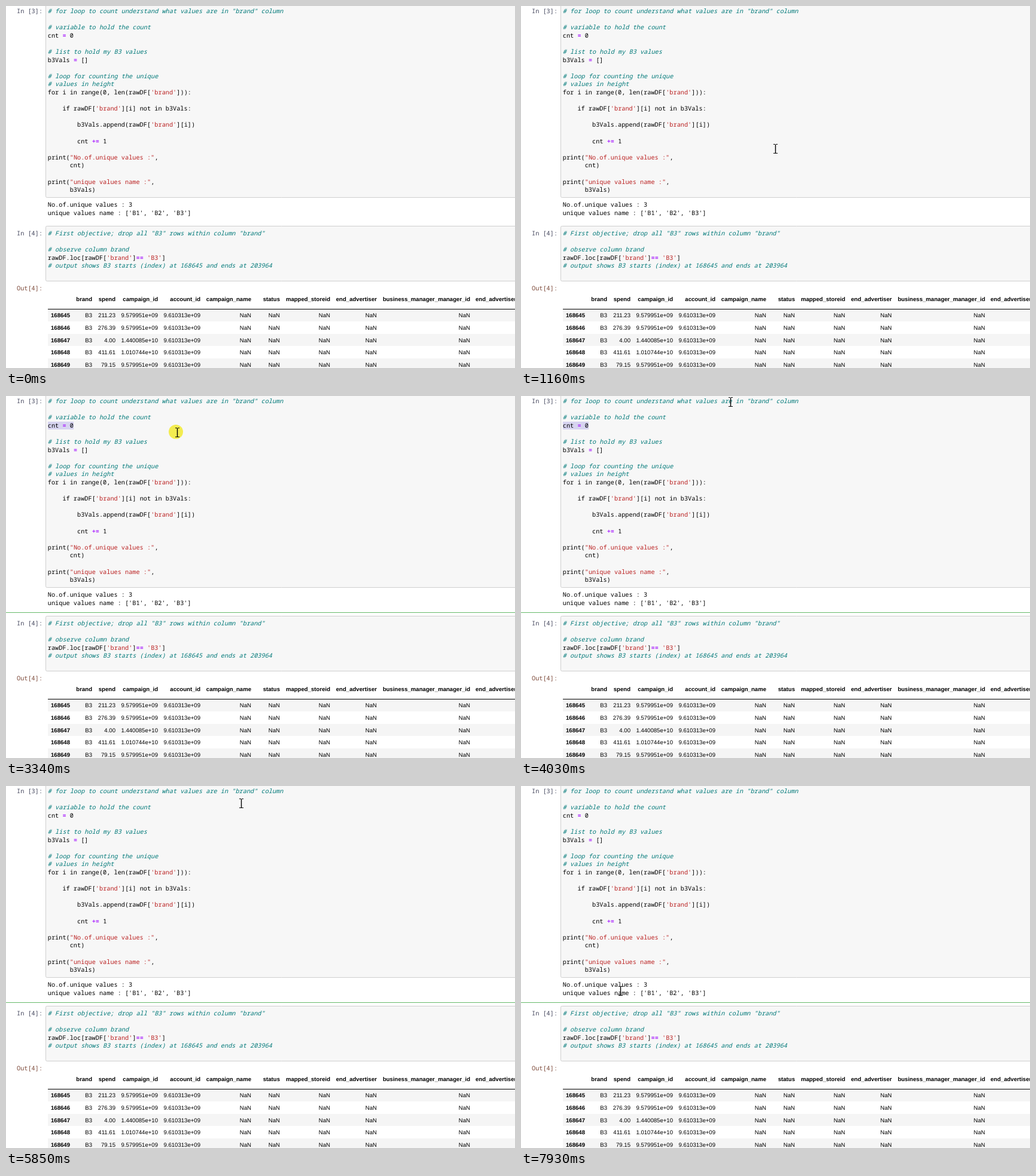
An HTML page with a canvas for the animation above (8 s loop, 851 by 606 pixels).

```html
<!DOCTYPE html>
<html lang="en">
<head>
<meta charset="utf-8">
<title>Notebook walkthrough</title>
<style>
  html, body { margin: 0; width: 100%; height: 100%; overflow: hidden; background: #fff; }
  canvas { display: block; }
</style>
</head>
<body>
<canvas id="stage" width="851" height="606"></canvas>
<script>
const W = 851, H = 606, LOOP = 8000, STEP = 70;
const ctx = document.getElementById('stage').getContext('2d');

const MONO = '10.264px "Noto Sans Mono", "DejaVu Sans Mono", monospace';
const SANS = '9.6px "Liberation Sans", Arial, sans-serif';
const CHAR = 6.158, LINE = 13.6, LEFT = 69.8;

const loopCell = `# for loop to count understand what values are in "brand" column

# variable to hold the count
cnt = 0

# list to hold my B3 values
b3Vals = []

# loop for counting the unique
# values in height
for i in range(0, len(rawDF['brand'])):

    if rawDF['brand'][i] not in b3Vals:

        b3Vals.append(rawDF['brand'][i])

        cnt += 1

print("No.of.unique values :",
      cnt)

print("unique values name :",
      b3Vals)`;

const filterCell = `# First objective; drop all "B3" rows within column "brand"

# observe column brand
rawDF.loc[rawDF['brand']== 'B3']
# output shows B3 starts (index) at 168645 and ends at 203964`;

const output = `No.of.unique values : 3
unique values name : ['B1', 'B2', 'B3']`;

// Column name and right edge
const columns = [
  ['brand', 144], ['spend', 183], ['campaign_id', 254], ['account_id', 325],
  ['campaign_name', 410], ['status', 458], ['mapped_storeid', 542],
  ['end_advertiser', 620], ['business_manager_manager_id', 776]
];
const spend = ['211.23', '276.39', '4.00', '411.61', '79.15'];
const campaign = ['9.579951e+09', '9.579951e+09', '1.440085e+10', '1.010744e+10', '9.579951e+09'];

// Pointer path: time, x, y
const path = [
  [660, 843, 581], [870, 660, 428], [1160, 425, 239], [1440, 301, 184],
  [1510, 270, 164], [1790, 140, 85], [2060, 77, 48], [2190, 77, 48],
  [2260, 74, 46], [2530, 73, 46], [2650, 73, 46], [2860, 112, 49],
  [3130, 210, 56], [3340, 286, 61], [3620, 326, 40], [4100, 359, -1],
  [4760, 359, -1], [4830, 370, 4], [5040, 385, 9], [5780, 385, 9],
  [6130, 424, 110], [6390, 438, 225], [6600, 437, 292], [6670, 436, 296],
  [6740, 436, 297], [6950, 370, 318], [7230, 225, 348], [7440, 185, 345],
  [7590, 182, 345], [7720, 182, 345], [7790, 176, 345], [7930, 166, 343]
];

const between = (t, a, b) => t >= a && t < b;

function box(x, y, w, h, color) {
  ctx.fillStyle = color;
  ctx.fillRect(x, y, w, h);
}

function text(str, x, y, font, color = '#000', align = 'left') {
  ctx.font = font;
  ctx.fillStyle = color;
  ctx.textAlign = align;
  ctx.fillText(str, x, y);
}

function frame(y, h) {
  ctx.beginPath();
  ctx.roundRect(66.5, y + 0.5, W, h, 2);
  ctx.fillStyle = '#f7f7f7';
  ctx.fill();
  ctx.strokeStyle = '#cfcfcf';
  ctx.lineWidth = 1;
  ctx.stroke();
}

function codeLine(line, y) {
  if (line[0] === '#') return text(line, LEFT, y, 'italic ' + MONO, '#007979');
  let col = 0;
  for (const part of line.split(/('[^']*'|"[^"]*"|[+=]+)/)) {
    const isString = /^['"]/.test(part), isOperator = /^[+=]/.test(part);
    const color = isString ? '#ba2121' : isOperator ? '#aa22ff' : '#000';
    text(part, LEFT + col * CHAR, y, (isOperator ? 'bold ' : '') + MONO, color);
    col += part.length;
  }
}

function eachLine(str, y, draw) {
  str.split('\n').forEach((line, i) => draw(line, Math.round(y + i * LINE)));
}

function table() {
  const bold = 'bold ' + SANS;
  for (const [name, x] of columns) text(name, x, 494, bold, '#000', 'right');
  text('end_advertiser_id', 785, 494, bold);
  box(70, 507, W, 1, '#000');
  spend.forEach((amount, r) => {
    const top = Math.round(508 + r * 20.6), y = Math.round(521 + r * 20.75);
    if (r % 2 === 0) box(70, top, W, 20, '#f5f5f5');
    text(168645 + r, 107, y, bold, '#000', 'right');
    const cells = ['B3', amount, campaign[r], '9.610313e+09'];
    columns.forEach(([, x], c) => text(cells[c] || 'NaN', x, y, SANS, '#000', 'right'));
  });
}

function pointer(t) {
  let i = path.length - 1;
  while (i > 0 && path[i][0] > t) i--;
  const [t0, x0, y0] = path[i];
  if (i === path.length - 1) return [x0, y0];
  const [t1, x1, y1] = path[i + 1];
  const k = Math.floor((t - t0) / STEP) * STEP / (t1 - t0);
  return [Math.round(x0 + (x1 - x0) * k), Math.round(y0 + (y1 - y0) * k)];
}

function beam(x, y) {
  box(x - 0.2, y - 7, 1.4, 15, '#000');
  for (const edge of [y - 8, y + 7]) {
    box(x - 3, edge, 3, 1, '#000');
    box(x + 1, edge, 3, 1, '#000');
  }
}

function draw(t) {
  const [x, y] = pointer(t);
  box(0, 0, W, H, '#fff');
  frame(-10, 330);
  frame(368, 92);

  if (between(t, 2650, 4370)) {
    const chars = Math.max(0, Math.min(7, Math.round((x - LEFT) / CHAR)));
    box(70, 43, chars * CHAR, 13, '#d7d4f0');
  }

  text('In [3]:', 18, 12, MONO, '#45485e');
  text('In [4]:', 18, 384, MONO, '#45485e');
  text('Out[4]:', 18, 476, MONO, '#7d4a3a');
  eachLine(loopCell, 12, codeLine);
  eachLine(output, 336, (line, base) => text(line, LEFT, base, MONO));
  eachLine(filterCell, 384, codeLine);
  table();

  if (t >= 2530) box(0, 362, W, 1, between(t, 4370, 5300) ? '#ababab' : '#66bb6a');
  if (between(t, 2530, 2730)) box(70, 43, 1, 13, '#000');

  if (between(t, 2530, 3410) || between(t, 4370, 4570) || between(t, 5300, 5500)) {
    ctx.beginPath();
    ctx.arc(x - 2, y - 1, 12, 0, Math.PI * 2);
    ctx.fillStyle = 'rgba(240, 230, 0, 0.68)';
    ctx.fill();
  }
  if (t >= 660) beam(x, y);
}

ctx.textRendering = 'geometricPrecision';
const start = performance.now();
function tick() {
  draw((performance.now() - start) % LOOP);
  requestAnimationFrame(tick);
}
tick();
</script>
</body>
</html>
```
